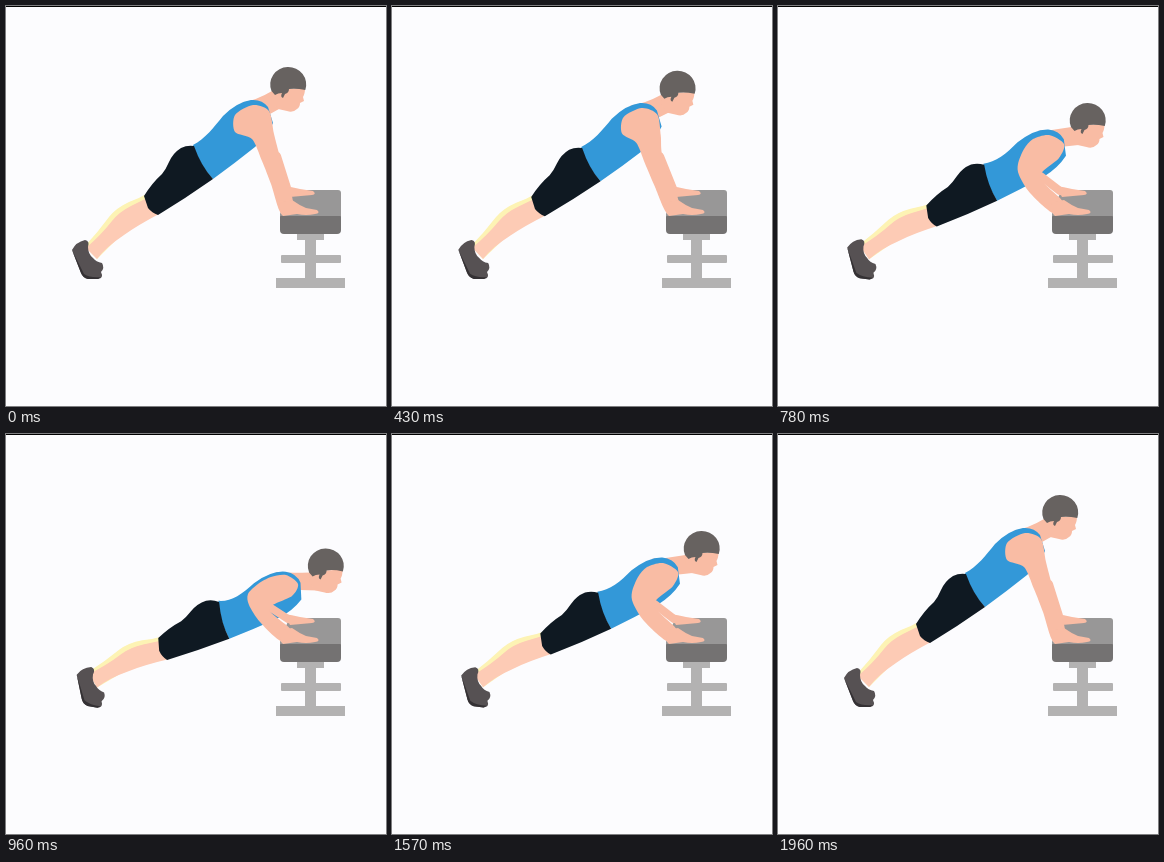
Write an HTML page with a canvas that moves like this. It is 380 px wide and 400 px high and loops after 2080 ms.

```html
<!DOCTYPE html>
<html lang="en">
<head>
<meta charset="utf-8">
<title>Incline push-up</title>
<style>
html, body { margin: 0; width: 100%; height: 100%; overflow: hidden; background: #fcfcfe; }
canvas { display: block; width: 380px; height: 400px; }
</style>
</head>
<body>
<canvas id="stage" width="380" height="400"></canvas>
<script>
const ctx = document.getElementById('stage').getContext('2d');
const LOOP = 2080, STEPS = 48, SWING = 13;
const ANGLE = 14.4 * Math.PI / 180;
const PAPER = '#fcfcfe', SKIN = '#f9bca4', LEG = '#fdcbb5', GLOW = '#fdf3b4', SHIRT = '#3398d8', SHORTS = '#0f1922';
const HAIR = '#676260', SHOE = '#565153', SOLE = '#343134', PAD = '#989797', EDGE = '#747272', METAL = '#b3b2b2';

const shapes = {
  glow: 'M79 240 Q92 226 103 211 Q110 202 123 196 Q134 192 142 187 L146 198 L91 253 Z',
  leg: 'M80 242 Q95 229 106 215 Q113 206 125 200 Q135 195 143 191 L153 208 Q132 219 118 229 Q100 241 91 253 Z',
  shorts: 'M138 190 Q146 177 156 168 Q160 163 163 156 Q167 147 175 142 Q181 139 188 140 Q195 160 207 173 Q180 192 152 209 Q146 207 142 202 Z',
  shoe: 'M66 244 Q70 236 79 234 Q84 235 82 241 Q82 248 87 252 Q90 256 96 257 Q99 262 95 266 Q98 272 92 273 H82 Q77 272 75 267 Z',
  sole: 'M66 244 L75 267 Q77 272 82 273 H92 L95 271 Q84 272 78 268 Z',
  face: 'M-16 6 L17 4 Q17 10 15 13 L16 17 L12 19 Q12 23 9 25 Q5 29 -1 27 L-10 25 L-16 17 Z',
  hair: 'M-16.5 7 A18 17.5 0 1 1 17.3 6 Q8 4 1 5 Q1 9 -3 10 L-5 14 Q-8 13 -6 9 Q-10 9 -13 11 Z',
  farHand: 'M278 180 Q286 181 294 183 L307 185 Q311 188 306 189 L284 191 Z',
  hand: 'M274 196 L286 194 Q293 199 300 202 L311 204 Q315 207 309 208 Q300 210 291 208 L277 210 Q273 208 274 196 Z'
};
for (const k in shapes) shapes[k] = new Path2D(shapes[k]);

// The lower back hollows as the chest goes down
const shirt = p => new Path2D(`M187 139 C199 ${133 + 4 * p} 208 ${121 + 6 * p} 217 ${110 + 3 * p}
  Q231 96 245 94 Q256 93 262 101 L267 117 Q261 131 249 141 Q229 157 207 173 Q194 160 187 139 Z`);

// Near arm outline, from the shoulder clockwise, at four depths of the press
const depths = [0, 4 / 13, 9 / 13, 1];
const arms = [
  [247,99, 263,105, 268,128, 274,151, 287,196, 275,207, 265,178, 256,155, 246,133, 229,126, 229,109],
  [258,111, 272,119, 271,134, 261,153, 286,196, 275,207, 255,185, 244,165, 239,148, 233,132, 239,118],
  [271,129, 286,138, 281,152, 262,171, 285,196, 275,207, 252,187, 241,169, 240,158, 246,143, 255,133],
  [280,141, 292,150, 286,162, 263,175, 285,196, 275,207, 254,188, 243,171, 242,160, 252,150, 265,143]
];

const mix = (a, b, t) => a + (b - a) * t;

function fill(path, color) {
  ctx.fillStyle = color;
  ctx.fill(path);
}

function box(x, y, w, h, color, r = 0) {
  ctx.fillStyle = color;
  ctx.beginPath();
  ctx.roundRect(x, y, w, h, r);
  ctx.fill();
}

function armAt(p) {
  let i = 0;
  while (i < 2 && p > depths[i + 1]) i++;
  const t = (p - depths[i]) / (depths[i + 1] - depths[i]);
  const v = arms[i].map((a, j) => mix(a, arms[i + 1][j], t));
  return v.flatMap((x, j) => j % 2 ? [] : [[x, v[j + 1]]]);
}

// Closed Catmull-Rom curve
function blob(pts) {
  const path = new Path2D(), n = pts.length, k = 0.14;
  path.moveTo(...pts[0]);
  for (let i = 0; i < n; i++) {
    const [a, b, c, d] = [n - 1, 0, 1, 2].map(o => pts[(i + o) % n]);
    path.bezierCurveTo(b[0] + (c[0] - a[0]) * k, b[1] + (c[1] - a[1]) * k,
      c[0] - (d[0] - b[0]) * k, c[1] - (d[1] - b[1]) * k, c[0], c[1]);
  }
  return path;
}

function bench() {
  fill(new Path2D('M286 184 H332 Q335 184 335 187 V213 H274 V208 L282 187 Z'), PAD);
  box(274, 210, 61, 18, EDGE, [1, 1, 4, 4]);
  box(291, 228, 27, 6, METAL);
  box(299, 234, 11, 38, METAL);
  box(275, 249, 60, 8, METAL, 1);
  box(270, 272, 69, 10, METAL);
}

function man(p) {
  const turn = ANGLE * p, c = Math.cos(turn), s = Math.sin(turn);
  const ax = 85 + 2.5 * p, ay = 244 - 0.8 * p;
  const place = (x, y) => [ax + (x - 85) * c - (y - 244) * s, ay + (x - 85) * s + (y - 244) * c];
  const body = (path, color) => {
    ctx.save();
    ctx.translate(ax, ay);
    ctx.rotate(turn);
    ctx.translate(-85, -244);
    fill(path, color);
    ctx.restore();
  };
  const arm = armAt(p), [hx, hy] = place(282, 78);

  body(shapes.glow, GLOW);
  body(shapes.leg, LEG);
  ctx.save();
  ctx.translate(88, 270);
  ctx.rotate(0.17 * p);
  ctx.translate(-88, -270);
  fill(shapes.shoe, SHOE);
  fill(shapes.sole, SOLE);
  ctx.restore();

  const neck = new Path2D();
  neck.moveTo(...place(235, 97));
  neck.quadraticCurveTo(...place(251, 94), hx - 16, hy + 7);
  neck.lineTo(hx - 9, hy + 25);
  neck.lineTo(...place(264, 108));
  fill(neck, SKIN);

  body(shirt(p), SHIRT);
  body(shapes.shorts, SHORTS);

  ctx.strokeStyle = SKIN;
  ctx.lineWidth = 8;
  ctx.lineCap = 'round';
  ctx.beginPath();
  ctx.moveTo(arm[3][0] - 3 + 5 * p, arm[3][1] - 1);
  ctx.lineTo(282, 185);
  ctx.stroke();
  fill(shapes.farHand, SKIN);

  ctx.save();
  ctx.translate(hx, hy);
  fill(shapes.face, SKIN);
  fill(shapes.hair, HAIR);
  ctx.restore();

  fill(blob(arm), SKIN);
  fill(shapes.hand, SKIN);
}

function draw(now) {
  const step = Math.floor((now % LOOP) / LOOP * STEPS + 0.1);
  const ramp = from => Math.min(1, Math.max(0, (step - from) / SWING));
  box(0, 0, 380, 400, PAPER);
  bench();
  man(ramp(9) - ramp(32));
  box(0, 0, 380, 1, '#000');
}

const start = performance.now();
function tick() {
  draw(performance.now() - start);
  requestAnimationFrame(tick);
}
tick();
</script>
</body>
</html>
```
